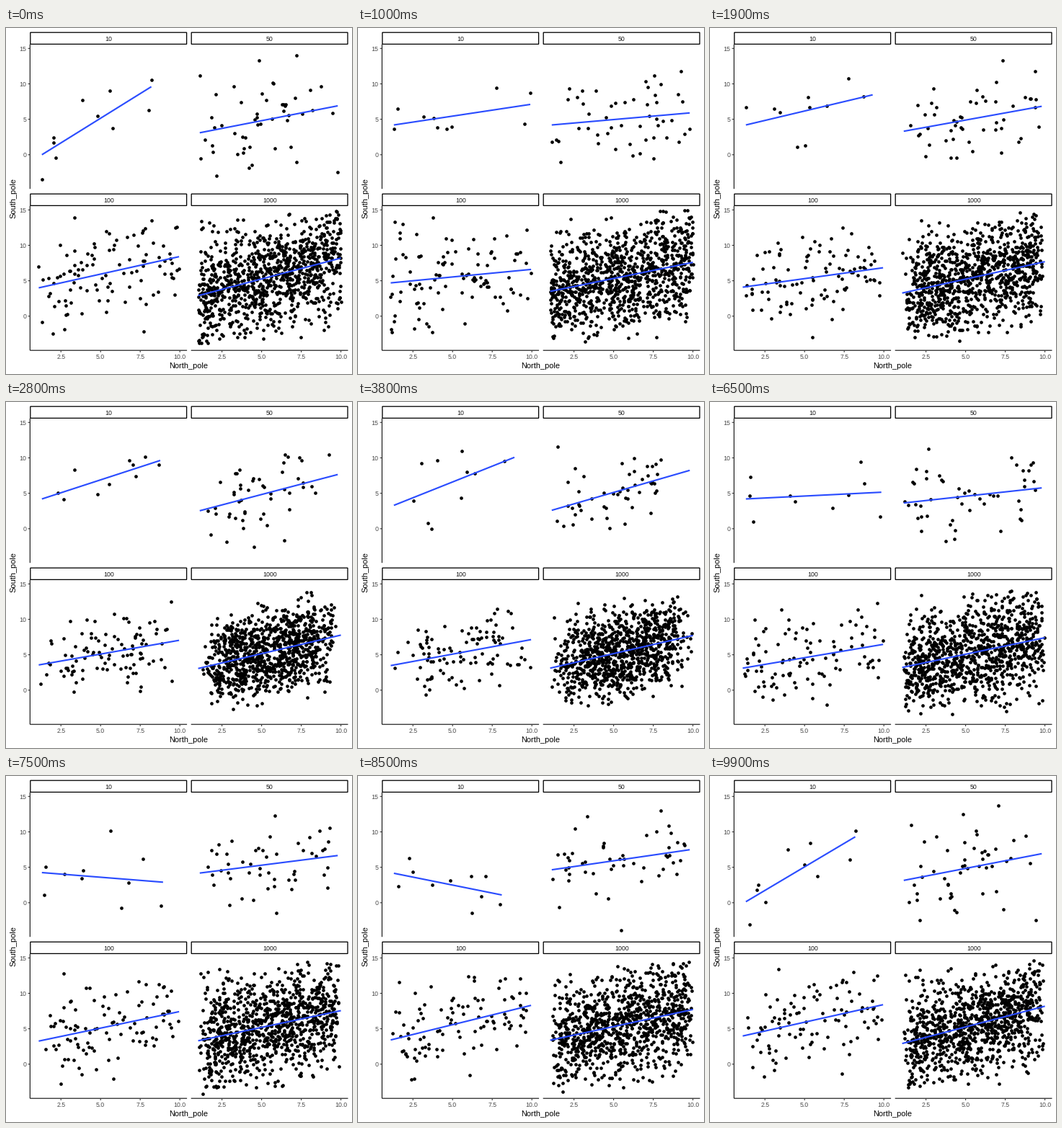
Recreate the animation shown at these times as a matplotlib script. Size 480 by 480 pixels, loop 10 s.

```python
import numpy as np
import matplotlib.pyplot as plt
from matplotlib.animation import FuncAnimation
from matplotlib.patches import Rectangle

SIZE = 480
PT = 0.75            # points per pixel at 96 dpi
STATES = 10
STEPS = 10           # frames per state
UNIT_X, UNIT_Y = 22.0, 9.83
LEFT, TOP = (33.3, 256.7), (22.6, 246.6)
WIDTH, HEIGHT = 217.8, 200.6
Y_MIN, Y_MAX = -3.8, 14.6
BLUE = "#2a4cff"

# Trend lines at the key states; the states between take a middle course.
KEYS = (0, 1, 3, 5, 6, 8, 10)
# Sample size: left x, right x, left y, right y, spread around the line.
SAMPLES = {
    10: (1.3, (8.2, 9.9, 8.6, 9.4, 9.9, 8.1),
         (0.0, 4.2, 4.2, 1.8, 4.2, 4.3),
         (9.6, 7.1, 10.0, 10.2, 5.3, 0.8), 3.0),
    50: (1.1, 9.8,
         (3.1, 4.2, 2.3, 3.1, 3.6, 4.7),
         (6.9, 5.9, 7.9, 8.8, 5.7, 7.5), 3.5),
    100: (1.1, 9.95,
          (4.0, 4.7, 3.4, 3.6, 3.1, 3.4),
          (8.4, 6.6, 7.1, 7.2, 6.4, 8.3), 3.6),
    1000: (1.0, 10.0,
           (2.9, 3.5, 3.0, 3.3, 3.2, 3.4),
           (8.2, 7.6, 7.8, 7.6, 7.4, 7.7), 3.9),
}

rng = np.random.default_rng(11)


def over_states(values):
    """Spread key values over all states, closing the loop."""
    keyed = np.broadcast_to(values, len(KEYS) - 1)
    return np.interp(range(STATES), KEYS, [*keyed, keyed[0]])


def cloud(n, trend, spread):
    """Random points whose least-squares line is the given trend."""
    (x0, y0), (x1, y1) = trend
    slope = (y1 - y0) / (x1 - x0)
    x = rng.uniform(x0, x1, 4 * n)
    noise = rng.normal(0, spread, 4 * n)
    y = y0 + slope * (x - x0) + noise
    inside = (y > Y_MIN) & (y < Y_MAX)
    x, noise = x[inside][:n], noise[inside][:n]
    x = x0 + (x - x.min()) * (x1 - x0) / np.ptp(x)
    noise = noise - np.polyval(np.polyfit(x, noise, 1), x)
    return np.column_stack([x, y0 + slope * (x - x0) + noise])


def to_pixels(data, col, row):
    origin = (LEFT[col] - 0.55 * UNIT_X, TOP[row] + 153.2)
    return np.asarray(data) * (UNIT_X, -UNIT_Y) + origin


trends, points = {}, []
for i, (n, (*ends, spread)) in enumerate(SAMPLES.items()):
    x0, x1, y0, y1 = map(over_states, ends)
    trend = np.stack([x0, y0, x1, y1], axis=1).reshape(STATES, 2, 2)
    cell = (i % 2, i // 2)
    trends[n] = to_pixels(trend, *cell)
    points.append(to_pixels([cloud(n, t, spread) for t in trend], *cell))
points = np.concatenate(points, axis=1)

plt.rcParams["font.family"] = ["Liberation Sans", "DejaVu Sans"]
fig = plt.figure(figsize=(5, 5), dpi=96, facecolor="white")
ax = fig.add_axes([0, 0, 1, 1])
ax.set_xlim(0, SIZE)
ax.set_ylim(SIZE, 0)
ax.axis("off")


def stroke(xs, ys, color="black", width=1.07, z=3):
    line, = ax.plot(xs, ys, color=color, lw=width * PT, zorder=z,
                    solid_capstyle="butt", snap=False)
    return line


def label(x, y, text, size=8.8, color="#4d4d4d", ha="center", **kw):
    ax.text(x, y, text, fontsize=size * PT, color=color, ha=ha,
            va="baseline", **kw)


def draw_panel(n, col, row):
    left, top = LEFT[col], TOP[row]
    right, bottom = left + WIDTH, top + HEIGHT
    ax.add_patch(Rectangle((left + 0.5, top - 16.4), WIDTH - 1, 16.2,
                           fc="white", ec="black", lw=1.3 * PT, snap=False))
    label((left + right) / 2, top - 4.6, str(n), color="#1a1a1a")
    if col == 0:
        stroke([left, left], [top, bottom])
        for value in (0, 5, 10, 15):
            _, y = to_pixels((0, value), col, row)
            stroke([left - 2.75, left], [y, y], "#333333")
            label(left - 5, y + 3.2, str(value), ha="right")
    if row == 1:
        stroke([left, right], [bottom, bottom])
        for value in (2.5, 5.0, 7.5, 10.0):
            x, _ = to_pixels((value, 0), col, row)
            stroke([x, x], [bottom, bottom + 2.75], "#333333")
            label(x, bottom + 11.9, f"{value:.1f}")


for i, n in enumerate(SAMPLES):
    draw_panel(n, i % 2, i // 2)
label(252.9, 472, "North_pole", 11, "black")
label(13.5, 236.3, "South_pole", 11, "black", rotation=90,
      rotation_mode="anchor")

dots = ax.scatter(*points[0].T, s=(4.7 * PT) ** 2, c="black", lw=0, zorder=4)
lines = {n: stroke(*trends[n][0].T, BLUE, 2.13, 5) for n in SAMPLES}


def blend(states, k, f):
    return states[k] * (1 - f) + states[(k + 1) % STATES] * f


def draw(i):
    k, step = divmod(i, STEPS)
    rest = 3 if k == 0 else 4
    t = max(0, step - rest) / (STEPS - rest)
    f = (1 - np.cos(np.pi * t)) / 2
    dots.set_offsets(blend(points, k, f))
    for n, line in lines.items():
        line.set_data(*blend(trends[n], k, f).T)
    return [dots, *lines.values()]


anim = FuncAnimation(fig, draw, frames=STATES * STEPS, interval=100,
                     repeat=True, repeat_delay=0, blit=False)
plt.show()
```
